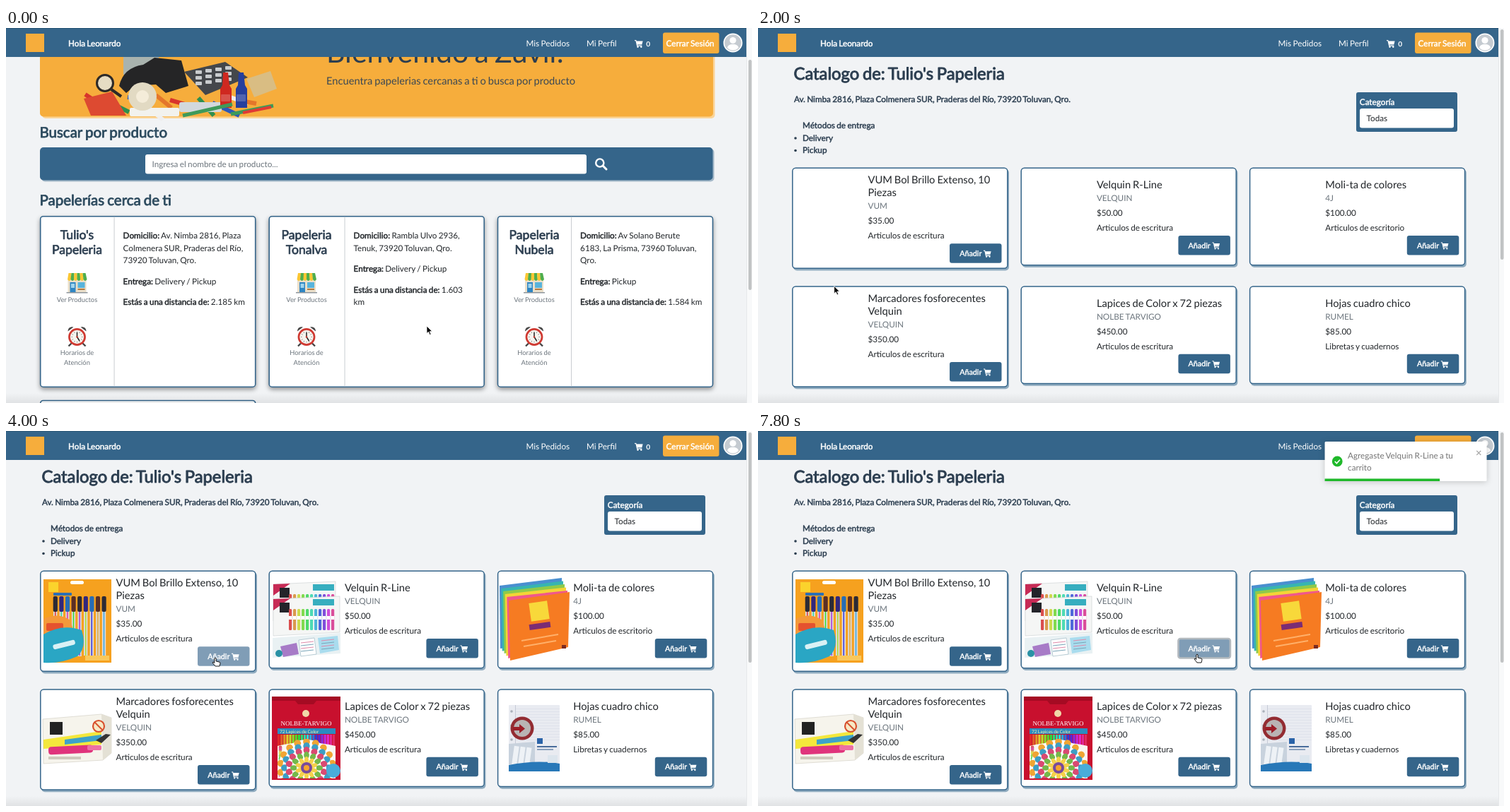
An HTML page for the animation above (8000 ms loop, 1055 px wide and 531 px high).

```html
<!DOCTYPE html>
<html lang="es">
<head>
<meta charset="utf-8">
<title>Papelerías</title>
<style>
html, body { margin: 0; width: 100%; height: 100%; overflow: hidden; background: #f1f3f5; }
svg { display: block; width: 1055px; height: 531px; font-family: Lato, sans-serif; }
text { fill: currentColor; white-space: pre; word-spacing: -.055em; text-rendering: geometricPrecision; }
.b { stroke: currentColor; stroke-width: .04em; stroke-linejoin: round; }
.mid { text-anchor: middle; }
</style>
</head>
<body>
<svg id="stage" viewBox="0 0 1055 531"></svg>
<script>
const BLUE = '#35658a', ORANGE = '#f6ad3c', INK = '#2c3e50', GREY = '#6c757d', GREEN = '#1fb82a';
const BASE = 11.72;

const rect = (x, y, w, h, fill, r = 0, more = '') =>
  `<rect x="${x}" y="${y}" width="${w}" height="${h}" rx="${r}" fill="${fill}" ${more}/>`;
const circle = (x, y, r, fill, more = '') => `<circle cx="${x}" cy="${y}" r="${r}" fill="${fill}" ${more}/>`;
const path = (d, fill, more = '') => `<path d="${d}" fill="${fill}" ${more}/>`;
const line = (d, color, w, more = '') => path(d, 'none', `stroke="${color}" stroke-width="${w}" ${more}`);
const text = (x, y, s, color = '#212529', size = BASE, cls = '') =>
  `<text x="${x}" y="${y}" font-size="${size}" color="${color}" class="${cls}">${s}</text>`;
const group = (s, attrs = '') => `<g ${attrs}>${s}</g>`;
const bold = s => `<tspan class="b">${s}</tspan>`;
const repeat = (n, f) => Array.from({ length: n }, (_, i) => f(i)).join('');

const cart = (x, y, k = 1) => group(
  path('M0 0h2.3l.4 1.6H11.6l-1.3 4.8H4l.3 1.2h6v1.2H3.2L1.5 1.2H0z', '#fff') +
  circle(4.5, 9.8, 1.2, '#fff') + circle(9.3, 9.8, 1.2, '#fff'),
  `transform="translate(${x} ${y}) scale(${k})"`);

const nav = () =>
  rect(0, 0, 1055, 41, BLUE) + rect(0, 0, 1055, 1, '#2d5878') +
  rect(28, 8, 26, 26, ORANGE) +
  text(88, 25.5, 'Hola Leonardo', '#fff', BASE, 'b') +
  group(
    text(735.5, 25.5, 'Mis Pedidos', '#fff') + text(821, 25.5, 'Mi Perfil', '#fff') +
    cart(889, 17) + `<text id="count" x="905.5" y="26" font-size="9.4" color="#fff" class="b">0</text>` +
    rect(929, 6.5, 79.5, 29.5, ORANGE, 3) + text(933.5, 25.5, 'Cerrar Sesión', '#fff', BASE, 'b') +
    circle(1028, 21, 13.5, '#fff') + circle(1028, 21, 11.8, '#c5cbd1') +
    circle(1028, 17.5, 4.6, '#fff') + path('M1020 28q1-5 8-5t8 5q-3.5 3.6-8 3.6t-8-3.6z', '#fff'),
    'id="links"');

// Home page
const shop = (x, y) => group(
  rect(2, 9, 26, 19, '#eadfca') + rect(5, 14, 8, 14, '#2f86c4') + rect(6.5, 16, 5, 6, '#9fd4ee') +
  rect(16, 14, 10, 8, '#58b4dc') + rect(16, 23, 10, 2, '#b5793e') +
  repeat(6, i => path(`M${3 + i * 4} 1h4l${(i - 2) * .5 + .5} 9q-2.5 4-5 0z`, i % 2 ? '#4fae4d' : '#fbc633')) +
  rect(0, 28, 30, 1.5, '#8d959b'), `transform="translate(${x - 15} ${y})"`);

const alarm = (x, y) => group(
  line('M-8 10l-4 4M8 10l4 4', '#444', 2.4) +
  path('M-13-7a6 6 0 0 1 8-6zM13-7a6 6 0 0 0-8-6z', '#474747') +
  circle(0, 1, 12.4, '#cf3a32') + circle(0, 1, 9.7, '#f6f5ef') +
  repeat(12, i => rect(-.4, -8, .8, 1.6, '#777', 0, `transform="translate(0 1) rotate(${i * 30})"`)) +
  line('M0-5.5V1L3.5 6.5', '#222', 1.5) + circle(0, 1, 1.3, '#cf3a32'),
  `transform="translate(${x} ${y})"`);

const stationery = () => {
  const tints = ['#d8342c', '#f6d23b', '#2f8f4e', '#2c59b8', '#efefef', '#e4762b'];
  return repeat(12, i => line(`M${112 + i * 20} ${94 + i * 7 % 17}l${38 - i % 3 * 8} ${25 - i % 4 * 7}`, tints[i % 6], 6)) +
    path('M110 100l40-10 20 34h-50z', '#dd4a31') + rect(175, 113, 70, 12, '#f2f2ee', 2) + rect(245, 105, 60, 14, '#d2d8dc', 3) +
    rect(166, 36, 50, 30, '#a9b3ae') + path('M160 82q6-26 34-30l16-10 38 4 10 36-32 10-14-12-30 2-12 10z', '#252526') +
    circle(193, 97, 20, '#e2dac3') + circle(193, 97, 9, '#f4ecd9') +
    circle(140, 78, 11.5, '#e6dcc3', 'stroke="#2d2a28" stroke-width="3"') + line('M149 87l14 10', '#2d2a28', 4) +
    path('M252 62l58-14 32 22-60 25z', '#44474b') +
    repeat(12, i => rect(268 + i % 4 * 14, 60 + (i / 4 | 0) * 8 - i % 4 * 2, 9, 5, '#c9ccce', 1)) +
    path('M340 72l34-11 9 25-32 12z', '#d9bd83') +
    [[302, '#cf2820'], [324, '#263f9d']].map(([x, c]) =>
      path(`M${x + 5} 63h7l2 18 3 5v27h-16V86l3-5z`, c) + rect(x + 2, 94, 13, 10, '#fff3', 1)).join('') +
    line('M250 124l70-16M318 122l60-12', '#3e9a5a', 5) + line('M335 120l40-8', '#e03a34', 4);
};

const storeCard = ([x, split, mid, name, lines]) =>
  rect(x + .7, 266.7, 304, 241.5, '#fff', 4, `stroke="${BLUE}" stroke-width="1.6" style="filter:drop-shadow(0 3px 3px #0006)"`) +
  rect(split - .4, 267.5, .9, 240, '#c3c8cc') +
  text(mid, 299, name[0], INK, 17.58, 'b mid') + text(mid, 319.7, name[1], INK, 17.58, 'b mid') +
  shop(mid, 346) + text(mid, 388, 'Ver Productos', GREY, 9.38, 'mid') +
  alarm(mid, 436.5) + text(mid, 462.5, 'Horarios de', GREY, 9.38, 'mid') + text(mid, 476.5, 'Atención', GREY, 9.38, 'mid') +
  lines.map(([y, s]) => text(split + 12.6, y, s)).join('');

const home = () =>
  rect(51, 20, 951.5, 108, '#fbd497', 5) + rect(48, 20, 952, 105.5, ORANGE, 5) + stationery() +
  text(453, 48.5, 'Bienvenido a Zuvil!', INK, 41) +
  text(453, 80, 'Encuentra papelerias cercanas a ti o busca por producto', '#3b4854', 14.7) +
  text(47.5, 155, 'Buscar por producto', '#2c4a5e', 20.5, 'b') +
  rect(50, 171, 951.5, 46.5, '#a3b8c8', 5) + rect(48, 169, 951.5, 46.5, BLUE, 5) +
  rect(197, 179, 624, 27.5, '#fff', 3) + text(206.5, 197, 'Ingresa el nombre de un producto...', GREY) +
  circle(839.8, 191, 5.6, 'none', 'stroke="#fff" stroke-width="2.4"') + line('M844 195l5 5', '#fff', 3, 'stroke-linecap="round"') +
  text(47.5, 251, 'Papelerías cerca de ti', '#2c4a5e', 20.5, 'b') +
  [
    [48, 153, 100.5, ["Tulio's", 'Papeleria'], [
      [298, bold('Domicilio:') + ' Av. Nimba 2816, Plaza'], [315.5, 'Colmenera SUR, Praderas del Río,'],
      [333, '73920 Toluvan, Qro.'], [362.5, bold('Entrega:') + ' Delivery / Pickup'],
      [391.5, bold('Estás a una distancia de:') + ' 2.185 km']]],
    [371.5, 479, 425, ['Papeleria', 'Tonalva'], [
      [298, bold('Domicilio:') + ' Rambla Ulvo 2936,'], [315.5, 'Tenuk, 73920 Toluvan, Qro.'],
      [345, bold('Entrega:') + ' Delivery / Pickup'], [374.5, bold('Estás a una distancia de:') + ' 1.603'], [391.5, 'km']]],
    [694.8, 799.5, 747, ['Papeleria', 'Nubela'], [
      [298, bold('Domicilio:') + ' Av Solano Berute'], [315.5, '6183, La Prisma, 73960 Toluvan,'], [333, 'Qro.'],
      [362.5, bold('Entrega:') + ' Pickup'], [391.5, bold('Estás a una distancia de:') + ' 1.584 km']]],
  ].map(storeCard).join('') +
  rect(48.7, 527.5, 304, 30, '#fff', 4, `stroke="${BLUE}" stroke-width="1.6"`);

// Catalogue
const category = (x, y) =>
  rect(x, y, 143, 56, BLUE, 3) + text(x + 4.8, y + 18, 'Categoría', '#fff', BASE, 'b') +
  rect(x + 5, y + 23, 133, 27.5, '#fff', 3) + text(x + 14.5, y + 41, 'Todas');

const hues = (i, n, s = 75, l = 52) => `hsl(${i * 360 / n} ${s}% ${l}%)`;

const pens = () =>
  rect(53, 210, 96, 118, '#f6a11f') + rect(91, 212, 19, 5, '#fff', 2.5) +
  rect(60, 214, 14, 14, '#fbd32c') + rect(67, 229, 26, 4, '#2b6fb5', 1) +
  repeat(9, i => {
    const x = 67 + i * 8.6;
    return rect(x, 242 - i % 3, 5.4, 78, '#dcd8d6') + rect(x + 2, 246, 1.4, 72, hues(i * 4, 9)) +
      rect(x - .3, 234, 6.2, 22, ['#2c2a35', '#32277c', '#276cb5', '#5b2f24'][i % 4], 2);
  }) +
  path('M53 266q22-10 38 2l6 20-44 10z', '#f4993a') + rect(57, 272, 24, 11, '#e5522f', 2) +
  path('M53 288q27-16 54-6 8 24-6 37-24 11-48 9z', '#2aa6c4') +
  rect(66, 299, 32, 7, '#d9f1f5', 3, 'transform="rotate(-14 82 302)"') + rect(112, 318, 34, 7, '#f9c85c');

const markerBox = (x, y, w) => group(
  path(`M0 4L${w} 0v51L0 56z`, '#f5f6f5', 'stroke="#d0d4d6" stroke-width=".7"') +
  path('M0 4l24-1L0 20z', '#c72b56') + rect(9, 9, 14, 14, '#24242a') +
  rect(56, 4, 30, 9, '#37aebf') +
  repeat(11, i => rect(22 + i * 6, 18, 4.2, 30, hues(i, 11, 65, 58), 1.5) + rect(22 + i * 6, 28, 4.2, 5, '#fff')),
  `transform="translate(${x} ${y})"`);

const markers = () =>
  markerBox(378, 213, 88) + markerBox(378, 234, 94) +
  path('M377 293l96-7v29l-96 6z', '#e9f1f3') + path('M388 305l23-5 3 16-22 4z', '#a77bc7') +
  path('M414 296l22-3 3 23-22 3z', '#fff', 'stroke="#9fb9c4" stroke-width=".7"') +
  path('M441 293l28-3 2 20-27 5z', '#a9dcee') +
  repeat(4, i => line(`M417 ${300 + i * 4}l18-2M446 ${297 + i * 4}l18-2`, i % 2 ? '#76a5b8' : '#df89a9', 1)) +
  circle(386, 315, 5, '#2a92a5');

const notes = () =>
  ['#4a8fd0', '#37b5b0', '#8fca4a', '#f4d436', '#f0578c'].map((c, i) =>
    path(`M${698 + i * 2.6} ${219 + i * 4}L${786 + i * 2} ${208 + i * 4.5}V300L${699 + i * 2.8} ${308 + i * 3.5}z`, c)).join('') +
  path('M711 240l86-12-2 78-82 19z', '#f67b22') +
  rect(741, 242, 26, 26, '#f8d83a', 0, 'transform="rotate(-8 754 255)"') +
  rect(740, 272, 30, 8, '#7b2c74', 0, 'transform="rotate(-8 755 276)"') +
  line('M729 297l52-9M732 305l46-8', '#ffb06a', 2) + rect(786, 303, 6, 5, '#7b2b20');

const highlighters = () =>
  path('M52 408l83-7 14 5v50l-12 10-84 5z', '#f6f4ec', 'stroke="#d5d2c7" stroke-width=".7"') +
  path('M135 401l14 5v50l-12 10z', '#e4e1d5') + rect(62, 412, 18, 18, '#222') +
  path('M53 437l82-12v19l-82 6z', '#f4e73c') + path('M83 437l52-7v8l-52 6z', '#3da2ca') +
  path('M127 438l14-9 7 1-13 12z', '#333') +
  rect(60, 446, 63, 11, '#e0347c', 4, 'transform="rotate(-3 90 451)"') + rect(115, 445, 20, 7, '#ed70a4', 2) +
  circle(131, 418, 8, '#f7e8c5', 'stroke="#d8502e" stroke-width="2.2"') + line('M125 412l12 12', '#d8502e', 2) +
  rect(60, 461, 46, 4, '#cfcabd');

const mandala = (x, y) => [[40, 18, '#f0a534'], [34, 16, '#3d9ec4'], [28, 14, '#d94a72'], [21, 12, '#75b84b'], [14, 10, '#f5d14b']]
  .map(([r, n, c]) => circle(x, y, r, '#fff') + repeat(n, i =>
    `<ellipse cx="${x}" cy="${y - r + 3}" rx="${r * 2.2 / n}" ry="5" fill="${c}" transform="rotate(${i * 360 / n} ${x} ${y})"/>`)).join('') +
  circle(x, y, 8, '#774a9c') + circle(x, y, 4, '#f6a22e');

const pencils = () =>
  rect(376, 376, 97, 118, '#c8102e') + path('M376 376h97v6h-34l-4 5h-22l-4-5h-33z', '#a50b23') +
  circle(424, 400, 5, '#f0d8a8') +
  `<text x="424.5" y="417" font-size="9" color="#fff" class="mid" font-family="Liberation Serif, serif">NOLBE-TARVIGO</text>` +
  rect(384, 421, 82, 8, '#2b8cc0') + text(387, 427.5, '72 Lapices de Color', '#fdf2ac', 6.5) +
  repeat(20, i => rect(384 + i * 4.1, 430, 3.2, 20, hues(i, 20))) +
  path('M384 446q40-10 82 0v46h-82z', '#f9f7f2') +
  repeat(24, i => circle(388 + i * 37 % 74, 448 + i * 23 % 42, 2.4, hues(i, 24, 65, 60))) +
  `<clipPath id="box"><rect x="384" y="436" width="82" height="56"/></clipPath>` + group(mandala(425, 477), 'clip-path="url(#box)"') +
  circle(463, 481, 10, '#49acd9');

const sheets = () =>
  rect(711, 388, 72, 94, '#e9ebf1', 1) + rect(720, 388, 1, 94, '#c6cad6') +
  repeat(12, i => rect(721, 393 + i * 4, 62, .5, '#d4d8e5')) + repeat(4, i => circle(715, 397 + i * 20, 1.8, '#aab0ba')) +
  circle(730, 421, 16.5, '#932c32') + circle(730, 421, 12, '#b9b4b4') + path('M717 419h9v-4l8 6.5-8 6.5v-4h-9z', '#9c1d27') +
  rect(751, 435, 8, 8, '#2a63a8') + rect(751, 446, 28, 2, '#496c9b') + rect(751, 450, 23, 2, '#8ba1bd') +
  path('M711 443l37-3v32h-37z', '#c8d2dd') +
  repeat(3, i => rect(717 + i * 9, 446 + i, 7, 27, '#eef2f6', 0, `transform="rotate(8 ${720 + i * 9} 459)"`)) +
  path('M711 473q40-8 72-2v11h-72z', '#2878b8') + rect(766, 459, 14, 11, '#dce5ed');

const button = (x, y, id) =>
  rect(x, y, 73.5, 27.5, BLUE, 3, `id="btn${id}"`) + text(x + 14.2, y + 17.6, 'Añadir', '#fff', 10.75, 'b') + cart(x + 48, y + 9.5, .92);

const PRODUCTS = [
  [['VUM Bol Brillo Extenso, 10', 'Piezas'], 'VUM', '$35.00', 'Articulos de escritura', pens],
  [['Velquin R-Line'], 'VELQUIN', '$50.00', 'Articulos de escritura', markers],
  [['Moli-ta de colores'], '4J', '$100.00', 'Articulos de escritorio', notes],
  [['Marcadores fosforecentes', 'Velquin'], 'VELQUIN', '$350.00', 'Articulos de escritura', highlighters],
  [['Lapices de Color x 72 piezas'], 'NOLBE TARVIGO', '$450.00', 'Articulos de escritura', pencils],
  [['Hojas cuadro chico'], 'RUMEL', '$85.00', 'Libretas y cuadernos', sheets],
];

const product = ([title, brand, price, kind, picture], i) => {
  const x = 48 + i % 3 * 323.4, y = 198 + (i / 3 | 0) * 167.7, two = title.length > 1;
  const h = two ? 142.5 : 138, top = y + (two ? 40 : 29), tx = x + 107.5;
  return rect(x + 2, y + 2, 305, h + 1, '#8fabbf', 5) +
    rect(x + .8, y + .3, 304, h - .5, '#fff', 4.5, `stroke="${BLUE}" stroke-width="1.5"`) +
    title.map((s, k) => text(tx, top + 17.6 * (k + 1 - title.length), s, '#212529', 14.7)).join('') +
    text(tx, top + 18, brand, GREY) + text(tx, top + 39, price) + text(tx, top + 60, kind) +
    button(x + 223, y + (two ? 107.3 : 96), i) + group(picture(), `id="pic${i}"`);
};

const catalog = () =>
  text(50.5, 73, "Catalogo de: Tulio's Papeleria", INK, 23.8, 'b') +
  text(51, 105, 'Av. Nimba 2816, Plaza Colmenera SUR, Praderas del Río, 73920 Toluvan, Qro.', INK, BASE, 'b') +
  text(63, 142, 'Métodos de entrega', INK, BASE, 'b') +
  ['Delivery', 'Pickup'].map((s, i) => circle(53, 156 + i * 17.5, 1.8, INK) + text(63, 159.7 + i * 17.5, s, INK, BASE, 'b')).join('') +
  category(846, 91) + PRODUCTS.map(product).join('');

const toast = () =>
  rect(800.8, 15, 229, 56, '#fff', 1.5, 'style="filter:drop-shadow(0 1px 4px #0003)"') +
  circle(818.5, 43, 7.4, GREEN) + line('M815 43l2.6 2.8 4.6-5', '#fff', 1.6) +
  text(833.3, 38.7, '<tspan id="msg0"></tspan>', '#757575') + text(833.3, 56.3, '<tspan id="msg1"></tspan>', '#757575') +
  line('M1015.5 28l6 6m0-6l-6 6', '#a8a8a8', 1.2) + rect(800.8, 67.5, 229, 3.5, GREEN, 0, 'id="bar"');

const stage = document.getElementById('stage');
const $ = id => document.getElementById(id);
stage.innerHTML =
  rect(0, 0, 1055, 531, '#f1f3f5') +
  group(home(), 'id="home"') +
  group(text(56.5, 73, 'Catalogo de:', INK, 23.8, 'b') + category(851, 56), 'id="loading"') +
  `<clipPath id="part"><rect x="690" y="200" width="120" height="58"/></clipPath>` +
  group(catalog(), 'id="catalog"') + nav() +
  `<linearGradient id="fade" x2="0" y2="1"><stop stop-opacity="0"/><stop offset="1" stop-opacity=".07"/></linearGradient>` +
  rect(0, 517, 1055, 14, 'url(#fade)') +
  group(rect(1047, 0, 8, 531, '#f8f9fa') + rect(1047, 0, .7, 531, '#dfe1e3') + rect(1050, 2, 4.5, 326, '#c1c3c4', 2.2, 'id="thumb"'), 'id="scroll"') +
  group(rect(-4, 518, 356, 18, '#303134', 2) +
    `<text x="4" y="528.5" font-size="8.8" color="#d5d7d9" letter-spacing=".32" style="word-spacing:0" font-family="Liberation Sans, sans-serif">Waiting for zuvil-reflective-bat-wq.mybluemix.net...</text>`, 'id="status"') +
  group(toast(), 'id="toast"') +
  group(path('M0 0v10.5l2.5-2.2 1.8 4.2 1.8-.8-1.8-4h3.4z', '#000', 'stroke="#fff" stroke-width=".8"'), 'id="arrow"') +
  group(path('M-1.2 1q1.2-1.8 2.3 0v4l5 1.2q1 .4.8 2L6 12H0l-4-5q.2-1.5 2-.3l.8.8z', '#fff', 'stroke="#000" stroke-width=".9" stroke-linejoin="round"'), 'id="hand"');

// Time, x, y of the pointer tip
const POINTER = [
  [0, 595, 422], [1000, 108, 372], [1400, 107, 368], [2400, 108, 364], [2600, 110, 364], [3600, 292, 322],
  [4000, 296, 321], [5200, 299, 316], [5400, 301, 316], [6200, 604, 319], [6600, 613, 320], [7800, 621, 316],
];
const CLICKS = [4400, 7150], LIFE = 2000, SLIDE = 735;
const TOASTS = [
  [4600, 'Agregaste VUM Bol Brillo Extenso,', '10 Piezas a tu carrito'],
  [7220, 'Agregaste Velquin R-Line a tu', 'carrito'],
];
const ENTER = [[0, 2198], [.6, -18.3], [.75, 7.3], [.9, -3.7], [1, 0]];
const LEAVE = [[0, 0], [.2, -14.6], [1, 1465]];
const smooth = p => p * p * (3 - 2 * p), easeOut = p => 1 - (1 - p) ** 3;

function track(steps, t, ease, k = 1) {
  const i = steps.findIndex(s => s[0] >= t);
  if (i < 0) return steps.at(-1)[k];
  if (!i) return steps[0][k];
  const a = steps[i - 1], b = steps[i];
  return a[k] + (b[k] - a[k]) * ease((t - a[0]) / (b[0] - a[0]));
}

const show = (id, on) => $(id).setAttribute('display', on ? 'inline' : 'none');

function drawToast(t) {
  const item = TOASTS.find(([start]) => t >= start && t < start + LIFE + SLIDE);
  show('toast', item);
  if (!item) return;
  const age = t - item[0], out = (age - LIFE) / SLIDE;
  const dx = out > 0 ? track(LEAVE, out, smooth) : track(ENTER, age / SLIDE, easeOut);
  $('toast').setAttribute('transform', `translate(${dx})`);
  $('toast').setAttribute('opacity', out > .2 ? 1 - smooth((out - .2) / .8) : 1);
  $('msg0').textContent = item[1];
  $('msg1').textContent = item[2];
  $('bar').setAttribute('width', 229 * Math.max(0, 1 - age / LIFE));
}

function drawButton(i, x, y, focused) {
  const b = $('btn' + i), left = +b.getAttribute('x'), top = +b.getAttribute('y');
  const hover = x >= left && x <= left + 73.5 && y >= top && y <= top + 27.5;
  b.setAttribute('fill', hover ? '#809db6' : focused ? '#565e66' : BLUE);
  b.setAttribute('stroke', focused ? '#b4babf' : 'none');
  b.setAttribute('stroke-width', 2.6);
  return hover;
}

function draw(t) {
  const isHome = t < 1400, isLoading = !isHome && t < 2000, isCatalog = t >= 2000;
  show('home', isHome);
  show('loading', isLoading);
  show('catalog', isCatalog);
  show('scroll', !isLoading);
  show('status', t >= 1000 && t < 2000);
  $('thumb').setAttribute('y', isHome ? 45 : 2);
  $('links').setAttribute('transform', `translate(${isLoading ? 11 : 0})`);
  $('count').textContent = CLICKS.filter(c => t >= c).length;
  [2200, 2600, 2400, 2600, 2200, 2200].forEach((at, i) => show('pic' + i, t >= at));
  $('pic2').setAttribute('clip-path', t < 2600 ? 'url(#part)' : 'none');

  const x = track(POINTER, t, smooth, 1), y = track(POINTER, t, smooth, 2);
  const over0 = drawButton(0, x, y, t >= CLICKS[0] && t < CLICKS[1]);
  const over1 = drawButton(1, x, y, t >= CLICKS[1]);
  const hand = over0 || over1 || (isHome && t >= 1000);
  show('hand', hand);
  show('arrow', !hand);
  $(hand ? 'hand' : 'arrow').setAttribute('transform', `translate(${x} ${y})`);
  drawToast(t);
}

const begin = performance.now();
function tick() {
  const t = Math.max(0, performance.now() - begin) % 8000;
  draw(Math.floor(t / 200) * 200);
  requestAnimationFrame(tick);
}
tick();
</script>
</body>
</html>
```
